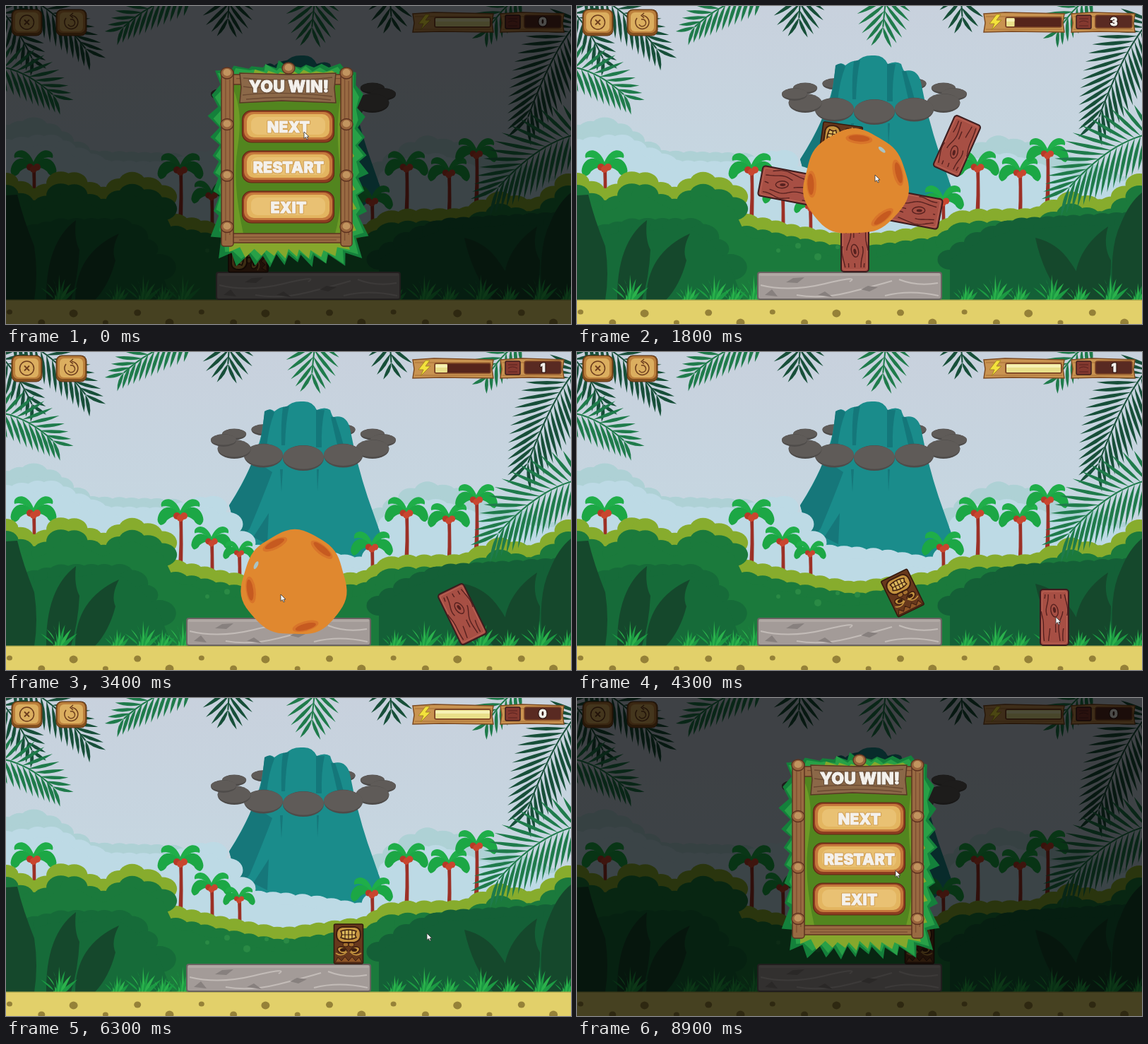
Recreate the animation shown at these times as an HTML page with a canvas. Size 800 px wide and 450 px high, loop 9000 ms.

```html
<!DOCTYPE html>
<html lang="en">
<head>
<meta charset="utf-8">
<title>Jungle blocks</title>
<style>
html, body { margin: 0; width: 100%; height: 100%; overflow: hidden; background: #c9d3de; }
canvas { display: block; width: 100%; height: 100%; }
</style>
</head>
<body>
<canvas id="stage" width="800" height="450"></canvas>
<script>
const W = 800, H = 450, LOOP = 9000, STEP = 100, TAU = Math.PI * 2, GROUND = 416;
const stage = document.getElementById('stage').getContext('2d');
let g = stage;

// ---------- helpers ----------
function paint(path, fill, stroke, width = 1) {
  if (fill) { g.fillStyle = fill; g.fill(path); }
  if (stroke) { g.strokeStyle = stroke; g.lineWidth = width; g.stroke(path); }
}
const shape = (d, fill, stroke, width) => paint(new Path2D(d), fill, stroke, width);
function oval(x, y, rx, ry, fill, stroke, width, turn = 0) {
  const p = new Path2D();
  p.ellipse(x, y, rx, ry, turn, 0, TAU);
  paint(p, fill, stroke, width);
}
function box(x, y, w, h, r, fill, stroke, width) {
  const p = new Path2D();
  p.roundRect(x, y, w, h, r);
  paint(p, fill, stroke, width);
}
function placed(x, y, deg, draw) {
  g.save();
  g.translate(x, y);
  g.rotate(deg * Math.PI / 180);
  draw();
  g.restore();
}
function label(text, x, y, size, outline) {
  g.font = `900 ${size}px Inter, "Open Sans", sans-serif`;
  g.textAlign = 'center';
  g.lineJoin = 'round';
  if (outline) { g.strokeStyle = outline; g.lineWidth = 3; g.strokeText(text, x, y); }
  g.strokeStyle = g.fillStyle = '#f4f1ec';
  g.lineWidth = .8;
  g.fillText(text, x, y);
  g.strokeText(text, x, y);
}
// Linear interpolation through [position, ...values] keys.
function at(keys, t) {
  const n = keys.findIndex(k => k[0] > t);
  if (n === 0) return keys[0].slice(1);
  if (n < 0) return keys[keys.length - 1].slice(1);
  const a = keys[n - 1], b = keys[n], u = (t - a[0]) / (b[0] - a[0]);
  return a.slice(1).map((v, i) => v + (b[i + 1] - v) * u);
}
const progress = (t, from, to) => Math.min(1, Math.max(0, (t - from) / (to - from)));
function seeded(seed) {
  return () => (seed = (seed * 16807) % 2147483647) / 2147483647;
}
function cached(draw) {
  const c = document.createElement('canvas');
  c.width = W; c.height = H;
  g = c.getContext('2d');
  draw();
  g = stage;
  return c;
}

// ---------- scenery ----------
// A bumpy skyline: round tufts follow the crest, and all below is filled.
function ridge(crest, color, seed, dy = 0) {
  const rnd = seeded(seed), body = new Path2D();
  const end = crest[crest.length - 1][0];
  body.moveTo(crest[0][0], GROUND);
  for (let x = crest[0][0]; x <= end; x += 17 + 7 * rnd()) {
    const r = 14 + 5 * rnd(), y = at(crest, x)[0] + r + dy;
    oval(x, y, r * 1.25, r, color);
    body.lineTo(x, y);
  }
  body.lineTo(end, GROUND);
  paint(body, color);
}
function cloudRing(front) {
  const side = front ? 1 : -1;
  for (let i = 0; i <= 6; i++) {
    const a = side * i * Math.PI / 6, s = Math.abs(Math.sin(a));
    const x = 421 + 113 * Math.cos(a), y = 125 + (front ? 25 : 17) * Math.sin(a);
    const rx = front ? 18 + 11 * s : 17, ry = front ? 9 + 9 * s : 8;
    oval(x, y, rx, ry, '#4e4b49');
    oval(x, y - 1, rx, ry - 1.5, '#5f5b58');
  }
}
function volcano() {
  cloudRing(false);
  shape('M366 88Q372 77 380 84Q392 75 396 79Q404 69 420 70Q434 69 440 82Q452 77 459 82Q462 92 464 92Q482 88 487 108Q497 160 512 205L532 262L520 300H340L316 217Q352 160 362 115Z', '#1a8c8b');
  shape('M350 152Q338 185 316 217L330 268L345 250Q364 205 377 170Z M372 228L370 272L350 262Z', '#16777a');
  shape('M366 84Q374 78 380 86Q372 105 369 135H359Q364 110 366 84Z M392 78L401 76Q396 98 395 132H390Q389 100 392 78Z M439 82H451Q446 105 447 135H439Z M460 92H466Q474 115 480 140H471Z', '#14777a');
  shape('M388 166H392L390 198Z M440 166H443L441 197Z', '#16777a');
  cloudRing(true);
}
function palm(x, y, size) {
  placed(x, y, 0, () => {
    shape('M-2 0Q0 40 -4 80H3Q4 40 3 0Z', '#9c3026');
    for (const side of [-1, 1]) {
      g.save();
      g.scale(side * size, size);
      shape('M-2 0C1 -16 12 -27 22 -23Q29 -20 27 -13Q13 -18 2 0Z', '#1fae49');
      shape('M0 2C8 -18 28 -16 32 2Q34 9 28 13Q22 12 19 6Q10 -2 0 2Z', '#1ca745');
      g.restore();
    }
    for (const dx of [-5, 5, 0]) oval(dx * size, dx ? 0 : 3, 5 * size, 5 * size, dx < 0 ? '#b73a28' : '#c9462f');
  });
}
// A drooping leaf stem with pairs of slender leaflets.
function frond(x0, y0, deg, length, leaf, color) {
  const a = deg * Math.PI / 180;
  const dx = length * Math.cos(a), dy = length * Math.sin(a), sag = length * .4;
  const stem = u => [x0 + dx * u, y0 + dy * u - sag * u * (1 - u)];
  const n = Math.ceil(length / 10), line = new Path2D();
  for (let i = 0; i <= n; i++) {
    const u = i / n, [x, y] = stem(u);
    const dir = Math.atan2(dy - sag * (1 - 2 * u), dx) * 180 / Math.PI;
    const l = leaf * (.5 + .5 * Math.sin(Math.PI * (.15 + .75 * u)));
    line.lineTo(x, y);
    for (const side of [-1, 1])
      placed(x, y, dir + side * (62 - 42 * u), () => shape(`M0 0Q${l * .5} -5 ${l} ${side * 4}Q${l * .45} 5 0 0`, color));
  }
  paint(line, null, color, 2);
}
function tuft(x, h) {
  for (let i = -3; i <= 3; i++) {
    const tip = x + i * h * .24, top = GROUND - h * (1 - Math.abs(i) * .17);
    shape(`M${x + i * 2 - 2} ${GROUND}Q${x + i * 2} ${top + h * .3} ${tip} ${top}Q${x + i * 3 + 2} ${top + h * .5} ${x + i * 2 + 3} ${GROUND}Z`, i % 2 ? '#1c9a43' : '#2bb24c');
  }
}
function jungle() {
  const crest = [[0,236],[45,262],[78,234],[105,236],[130,260],[180,234],[220,250],[240,294],[300,308],
    [390,325],[515,308],[550,287],[650,286],[700,262],[750,276],[800,234]];
  ridge(crest, '#87ac2d', 11);
  ridge(crest, '#1b7a3c', 11, 17);
  ridge([[0,318],[80,300],[170,300],[235,370]], '#166b39', 5);
  ridge([[528,345],[570,318],[620,300],[800,290]], '#146037', 8);
  for (let i = 0; i < 5; i++) oval(285 + 28 * i, 346 + 9 * Math.sin(i * 4), 3 + i % 3, 3 + i % 3, '#2a8a45');
  shape('M0 268L16 267Q24 300 40 340Q46 380 40 416H0Z M57 416Q56 335 99 303Q96 330 104 345Q102 385 92 416Z M98 416Q98 350 160 322Q148 345 155 360Q146 395 126 416Z', '#15482c');
  shape('M649 328Q680 335 698 362Q716 385 718 416H690Q660 380 649 328Z M706 416Q696 350 752 312Q744 340 756 360Q756 395 746 416Z M760 416Q752 345 770 308Q782 278 800 264V416Z', '#15482c');
  [75, 157, 194, 221, 250, 550, 592, 625, 672, 710, 755, 794].forEach((x, i) => tuft(x, i % 2 ? 24 : 36));
}
function scenery() {
  const sky = g.createLinearGradient(0, 0, 0, 300);
  sky.addColorStop(0, '#c8d1dd');
  sky.addColorStop(1, '#c5d8e2');
  box(0, 0, W, H, 0, sky);
  ridge([[0,168],[45,156],[120,204],[240,208],[300,230]], '#aed1d5', 3);
  ridge([[530,220],[590,182],[640,192],[800,250]], '#aed1d5', 4);
  volcano();
  ridge([[0,188],[60,180],[140,218],[230,220],[290,200],[322,235],[345,272],[430,278],[500,290],[532,270],
    [548,222],[600,205],[700,240],[800,250]], '#bddae5', 6);
  for (const p of [[39,228,1],[247,232,1],[291,268,.88],[330,284,.7],[567,228,.95],[627,236,.92],[666,209,.92],[518,276,.92]]) palm(...p);
  jungle();
  box(0, GROUND, W, H - GROUND, 0, '#e2d06a');
  box(0, GROUND - .5, W, 1.5, 0, '#b8b052');
  for (let i = 0; i < 18; i++) {
    const r = 4 + i * 7 % 3;
    oval(5 + i * 45.3, i % 2 ? 448 : 433 + i % 3, r, r * .9, '#958138');
  }
  const dark = '#174f39', green = '#1f7b4b';
  frond(10, -20, 38, 130, 48, dark);
  frond(-15, 0, 55, 90, 38, dark);
  frond(-20, 85, 25, 95, 46, green);
  frond(262, -15, 155, 105, 42, green);
  frond(318, -25, 95, 42, 46, dark);
  frond(440, -25, 97, 55, 48, green);
  frond(542, -25, 85, 40, 40, dark);
  frond(728, -12, 135, 65, 38, green);
  frond(812, 20, 118, 155, 62, dark);
  frond(815, 180, 147, 140, 66, green);
}

// ---------- blocks ----------
function wood(w, h) {
  if (h > w) return placed(0, 0, 90, () => wood(h, w));
  const line = '#57211f', knots = w > 150 ? [-.38, -.02, .38] : [.12];
  box(-w / 2, -h / 2, w, h, 4, '#a74f44', '#3b1c1e', 2);
  box(-w / 2 + 3, -h / 2 + 2.5, w - 6, h - 5, 3, null, '#bd6557', 1);
  // Grain runs along the board and bends around the knots.
  for (let row = 0; row < 5; row++) {
    const y = h * (row - 2) * .17, side = row < 2 ? -1 : 1, p = new Path2D();
    let down = false;
    for (let x = -w / 2 + 6; x < w / 2 - 5; x += 3) {
      const near = Math.max(...knots.map(k => Math.exp(-(((x - k * w) / 15) ** 2))));
      const yy = y + 1.8 * Math.sin(x * .08 + row * 1.7) * (1 - near) + side * near * 5;
      const show = Math.sin(x * .09 + row * 2.1) < .8 && (row !== 2 || near < .3);
      show && down ? p.lineTo(x, yy) : p.moveTo(x, yy);
      down = show;
    }
    paint(p, null, line, 1.4);
  }
  for (const k of knots) {
    oval(k * w, 0, 9, 5, null, line, 1.4, -.2);
    oval(k * w + 1, 0, 4, 2, line, null, 1, -.2);
  }
}
function stone(x) {
  placed(x, 377, 0, () => {
    box(0, 0, 260, 38, 3, '#a39b98', '#6a6361', 2);
    box(2, 1, 256, 4, 2, '#b0a8a4');
    shape('M4 18Q45 28 95 16T130 13M55 32Q90 38 130 28T190 12M180 33Q215 24 256 33M200 10Q225 20 255 15', null, '#c3bcb8', 2);
    shape('M40 14L50 8L66 7L56 15Z M146 24L156 19L170 21L158 27Z M10 32L20 24L28 34Z M85 32L95 27L106 35Z', '#87807e');
  });
}
function ice() {
  box(255, 337, 261, 40, 3, '#a5cfdd', '#5b91aa', 2);
  shape('M256 352Q300 344 340 356T430 352T515 356V376H256Z', '#93c1d0');
  for (const [x, w] of [[262, 14], [438, 8], [457, 15]]) shape(`M${x} 375l30 -36h${w}l-30 36Z`, '#d8eaf0');
}
function tiki() {
  const gold = '#c4933f', deep = '#3d1d0f';
  box(-20.5, -28, 41, 56, 2, '#67381c', '#35190d', 1.6);
  shape('M-19 -26H19L15 -19L10 -24L5 -18L0 -24L-5 -18L-10 -24L-15 -19Z', '#8f5527', deep, 1);
  for (const s of [-1, 1]) {
    oval(s * 9, -9, 7, 4.5, gold, deep, 1.5, s * .4);
    oval(s * 8, -8.5, 4, 2.5, deep);
    shape(`M${s * 2} -11Q${s * 10} -19 ${s * 18} -13`, null, gold, 1.6);
    oval(s * 4, -1, 4, 3, '#a5702f', deep, 1);
  }
  shape('M-8 2H8Q17 4 17 13Q17 23 9 24H-9Q-17 23 -17 13Q-17 4 -8 2Z', gold, deep, 2);
  shape('M-11 9Q0 4 11 9Q8 13 11 18Q0 22 -11 18Q-8 13 -11 9Z', '#dcb85c', deep, 1.5);
  shape('M-5 7V19M0 6V20M5 7V19M-10 13H10', null, deep, 1.2);
}

// ---------- effects ----------
const water = [
  'M370 216Q380 203 400 206Q428 201 458 230Q486 252 493 285Q494 305 485 306Q470 300 460 280Q440 262 428 268Q412 272 400 280Q385 295 372 312Q378 290 395 268Q412 248 408 232Q395 228 388 238L383 264Q380 235 370 216Z',
  'M312 224Q318 240 310 253Q320 262 318 285Q316 306 303 305Q293 295 294 282Q283 276 285 264Q298 252 303 232Z',
  'M319 253Q336 258 345 266Q356 278 357 294Q350 276 338 272Q328 270 319 253Z',
  'M374 304Q374 335 375 345Q368 360 375 382Q396 386 414 389Q415 402 400 402Q365 398 350 380Q335 365 328 350Q330 338 345 340Q362 336 374 304Z',
  'M287 352Q302 350 312 368Q340 398 372 403Q420 398 440 410Q440 424 405 428Q365 430 340 410Q306 396 295 378Z',
  'M425 290Q431 305 436 318Q427 329 418 317Q412 303 425 290Z',
  'M486 311Q486 330 474 340Q463 349 455 345Q456 331 470 323Z'
];
function splash(t) {
  const grow = progress(t, 300, 600), fade = progress(t, 600, 900);
  if (grow === 0 || fade === 1) return;
  const size = .4 + .6 * grow + .2 * fade;
  g.save();
  g.globalAlpha = 1 - fade;
  g.translate(388, 320);
  g.scale(size, size);
  g.translate(-388, -320);
  for (const d of water) shape(d, '#5e8093', '#4b6b7d', 1);
  g.lineCap = 'round';
  shape('M476 274L482 292M442 232L454 252M380 212L389 211M303 278L305 294M294 362L308 378M337 346L344 358M372 420L402 421', null, '#82b7ca', 6);
  g.restore();
}
// A lumpy fireball that swells, then opens into a thinning ring.
function fireball(t, { time, x, y, turn }) {
  const swell = progress(t, time - 100, time), burn = progress(t, time + 100, time + 400);
  if (t < time || burn === 1) return;
  placed(x, y, turn, () => {
    const size = .85 + .15 * swell + .15 * burn, p = new Path2D();
    g.scale(size, size);
    g.globalAlpha = 1 - burn * burn;
    for (let a = 0; a < TAU; a += .08) {
      const r = 74 + 2 * Math.sin(3 * a + .6) + 1.3 * Math.sin(7 * a);
      p.lineTo(r * Math.cos(a), r * Math.sin(a));
    }
    p.closePath();
    if (burn) p.arc(4, -4, 74 * burn, 0, TAU);
    g.fillStyle = '#e0882f';
    g.fill(p, 'evenodd');
    if (burn) return;
    for (const deg of [-85, -13, 52, 178])
      placed(0, 0, deg, () => {
        oval(62, 0, 7, 19, '#d8742a');
        oval(63, 0, 4.5, 15, '#c65a20');
      });
    placed(0, 0, -51, () => oval(60, 0, 2.5, 6, '#a9c3c4'));
  });
}

// ---------- interface ----------
function boards() {
  for (const x of [8, 71]) {
    box(x, 5, 43, 37, 8, '#84501f', '#5d3417', 1);
    box(x + 2, 6, 39, 32, 7, '#bb7f3c');
    box(x + 5, 9, 33, 27, 6, '#dbae5f');
  }
  oval(29.5, 23, 10, 10, null, '#6d3d1d', 1.5);
  shape('M26 19.500l7 7m0 -7l-7 7', null, '#6d3d1d', 1.8);
  shape('M85 17A9.500 9.500 0 1 0 93 13.500M91 19A5 5 0 1 1 88 26M95 10l-4 3.500l4 3.500', null, '#6d3d1d', 1.5);
  for (const [l, r] of [[576, 690], [700, 790]]) {
    shape(`M${l} 11L${l + 30} 9L${r} 11L${r - 2} 24L${r} 37L${l + 40} 36L${l} 37L${l + 2} 24Z`, '#c99350', '#7d4b23', 1.5);
    shape(`M${l + 3} 15H${r - 3}M${l + 3} 33H${r - 3}`, null, '#a66f37', 1);
  }
  box(607, 16, 79, 14, 2, '#55241b', '#7d4425', 1.5);
  box(707, 13, 21, 19, 2, '#84392f', '#3b1c1e', 1.5);
  shape('M711 18h13M711 23q6-4 13 0M711 28h13', null, '#57211f', 1);
  box(734, 13, 52, 18, 3, '#592a22', '#7d4425', 1.5);
  shape('M594 12L584 25H591L587 34L601 20H594L600 12Z', '#f3e23c', '#a88a22', 1);
}
function meters(level, count) {
  box(608, 17, 77 * level, 12, 1, '#e9e08a');
  box(608, 18, 77 * level, 4, 1, '#f6f1b5');
  label(count, 760, 28, 16, '#2d1511');
}
// Leafy border: a squarish outline with leaning random spikes.
function ivy(w, h, spike, color, seed) {
  const rnd = seeded(seed), p = new Path2D(), points = 72;
  for (let i = 0; i < points; i++) {
    const a = i / points * TAU, c = Math.cos(a), s = Math.sin(a);
    const k = (Math.abs(c) ** 9 + Math.abs(s) ** 9) ** (-1 / 9);
    const tip = i % 2, out = tip ? spike * (.3 + .7 * rnd()) : -3 * rnd();
    p.lineTo(400 + c * k * (w / 2 + out) + 4 * tip * s, 220 + s * k * (h / 2 + out) + 4 * tip);
  }
  p.closePath();
  paint(p, color);
}
function log(x, y, w, h) {
  box(x, y, w, h, 4, '#986a42', '#5e3320', 1.5);
  shape(h > w ? `M${x + w * .35} ${y + 8}v${h - 16}M${x + w * .7} ${y + 14}v${h - 30}`
              : `M${x + 8} ${y + h * .4}h${w - 16}M${x + 20} ${y + h * .7}h${w - 40}`, null, '#7a4c30', 1.2);
}
function winPanel() {
  box(0, 0, W, H, 0, 'rgba(0,0,0,.69)');
  ivy(200, 268, 14, '#14803b', 7);
  ivy(192, 260, 12, '#28a047', 23);
  ivy(172, 252, 9, '#86a72c', 41);
  box(318, 98, 160, 228, 4, '#52851f');
  shape('M322 118Q336 150 328 200T336 322H322ZM476 118Q466 160 472 220T466 322H476Z', '#6d9a27');
  log(318, 97, 164, 14);
  log(310, 322, 178, 13);
  log(305, 90, 17, 250);
  log(474, 92, 16, 248);
  const knot = (x, y) => {
    oval(x, y, 9, 8, '#99653d', '#5e3320', 1.4);
    oval(x, y - 1, 5.5, 5, '#c1945f');
  };
  knot(400, 88);
  for (let i = 0; i < 4; i++) for (const x of [313, 482]) knot(x, 95 + 72.5 * i);
  shape('M331 95L400 97L467 95L465 116L467 137L390 134L331 137L333 115Z', '#8b6848', '#573824', 1.5);
  shape('M336 102Q400 108 462 101M335 126Q390 120 462 128M340 132Q400 126 460 133M336 114Q360 118 380 112', null, '#6b4a32', 1.3);
  label('YOU WIN!', 400.5, 122, 23, '#69503c');
  ['NEXT', 'RESTART', 'EXIT'].forEach((text, i) => {
    const y = 148 + 57 * i;
    box(334.5, y, 130, 45, 13, '#8d3d20', '#5e2716', 1.2);
    box(337, y + 2, 125, 39, 12, '#c5793c');
    box(341, y + 5, 117, 33, 10, '#e3b560');
    box(347, y + 9, 105, 25, 9, '#e9c173');
    label(text, 400, y + 31, 21.5, '#d2a055');
  });
}
function cursor(x, y) {
  placed(x, y, 0, () => shape('M0 0V9.500L2.300 7.500L4 11L5.500 10.300L4 7H7Z', '#fff', '#333', .8));
}

// ---------- timeline ----------
const LEVEL_START = 200, MELT = 800, LANDED = 1100;
const clicks = {
  upper: { time: 1700, x: 394, y: 250, turn: 0 },
  lower: { time: 2600, x: 398, y: 276, turn: 60 },
  column: { time: 3300, x: 408, y: 328, turn: -103 },
  block: { time: 4500, x: 676, y: 375, turn: 40 }
};
const pops = [MELT, ...Object.values(clicks).map(c => c.time)];
// Poses once the stack has landed: [time, x, y, degrees].
const pieces = [
  { name: 'column', draw: () => wood(78, 39), path: [[LANDED, 393.5, 337, 90]] },
  { name: 'lower', draw: () => wood(259, 43), path: [[1300, 390.5, 278, 0], [1800, 387, 271, 10.7], [2600, 398, 280, 14]] },
  { name: 'upper', draw: () => wood(259, 45), path: [[1300, 390.5, 236, 0], [1700, 390, 233, 7]] },
  { name: 'block', draw: () => wood(40, 79),
    path: [[1300, 490.5, 176, 0], [1800, 538, 198, 24], [2500, 592, 350, 82], [3400, 646, 371, 154], [3700, 676, 375.5, 180]] },
  { name: 'tiki', draw: tiki,
    path: [[1300, 326.5, 174, 0], [1800, 374, 188, 98], [2850, 400, 278, 90], [3600, 412, 350, 100], [4300, 461, 341, 154], [4600, 485, 348, 180]] }
];
const pointer = [[700,422,178],[1500,422,239],[2000,422,239],[2600,428,276],[3200,389,343],[3500,389,343],
  [4200,678,375],[4800,678,375],[6300,596,333],[7100,487,283],[7300,487,283],[7600,475,241],[7700,475,241],[8200,451,244]];
const charge = [[600, 0], [1800, .15], [3400, .22], [4200, 1]];

const backdrop = cached(() => { scenery(); boards(); });
const panel = cached(winPanel);

function level(t) {
  stone(256);
  if (t < MELT) ice();
  const lift = 40 * (1 - progress(t, MELT, LANDED) ** 2);
  for (const { name, draw, path } of pieces) {
    if (clicks[name] && t >= clicks[name].time) continue;
    const [x, y, deg] = at(path, t);
    placed(x, y - lift, deg, draw);
  }
  splash(t);
  for (const click of Object.values(clicks)) fireball(t, click);
  meters(at(charge, t)[0], pops.filter(time => t < time).length);
}
function render(t) {
  g.drawImage(backdrop, 0, 0);
  if (t < LEVEL_START) {
    stone(298);
    placed(343, 356, 90, tiki);
    meters(1, 0);
  } else {
    level(t);
  }
  g.globalAlpha = 1 - progress(t, 0, 300) + progress(t, 8400, 8900);
  g.drawImage(panel, 0, 0);
  g.globalAlpha = 1;
  cursor(...at(pointer, t));
}
const started = performance.now();
function tick() {
  const t = (performance.now() - started) % LOOP;
  render(Math.floor(t / STEP) * STEP);
  requestAnimationFrame(tick);
}
tick();
</script>
</body>
</html>
```
